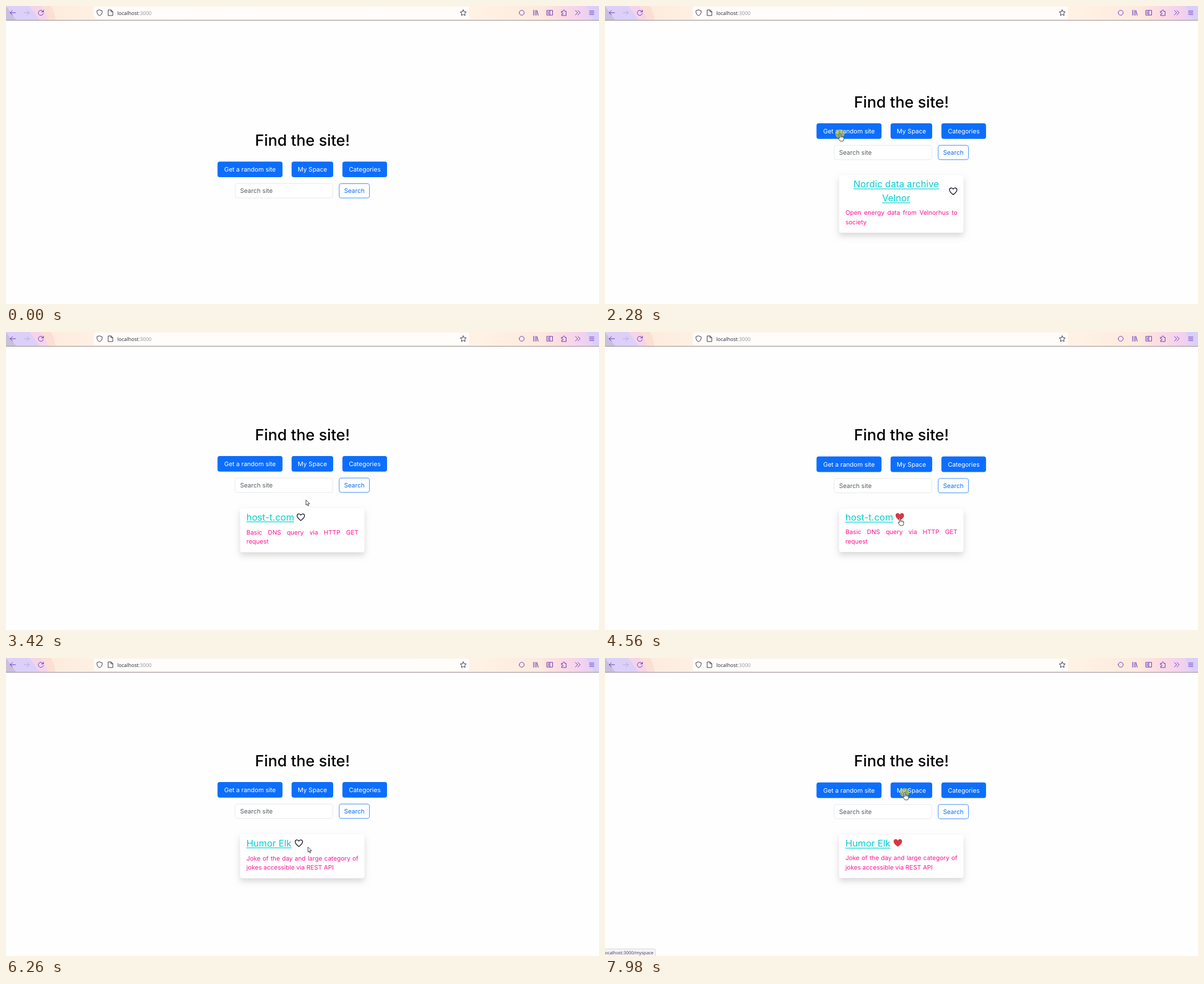
These frames come from a looping animation (1055 by 531 pixels, 8 s). An HTML page with a canvas:

```html
<!DOCTYPE html>
<html lang="en">
<head>
<meta charset="utf-8">
<title>Find the site!</title>
<style>
html, body { margin: 0; width: 100%; height: 100%; overflow: hidden; background: #fefefe; }
canvas { display: block; width: 1055px; height: 531px; }
</style>
</head>
<body>
<canvas id="stage" width="1055" height="531"></canvas>
<script>
const ctx = document.getElementById('stage').getContext('2d');
ctx.textRendering = 'geometricPrecision';
const LOOP = 8000;
const BLUE = '#0d6efd', PURPLE = '#5b22b5', DARK = '#211c30';
const SANS = 'Inter, sans-serif', UI = '"Open Sans", "Noto Sans", sans-serif';

const energy = {
  height: 102.5, titleY: 15.5, textY: 66.5, center: 518, heart: 619.5, heartY: 28.5,
  title: ['Nordic data archive', 'Velnor'],
  text: ['Open energy data from Velnorhus to', 'society']
};
const host = {
  height: 78.5, titleY: 15.5, textY: 42.5, heart: 524.5, heartY: 16,
  title: ['host-t.com'],
  text: ['Basic DNS query via HTTP GET', 'request']
};
const jokes = {
  ...host, heart: 521, title: ['Humor Elk'],
  text: ['Joke of the day and large category of', 'jokes accessible via REST API']
};
const liked = card => ({ ...card, liked: true, height: 77, titleY: 15, textY: 41, heartY: 14.5 });

// shift: vertical offset of the page content; cursor: [kind, x, y]
const idle = { shift: 0 };
const first = { shift: -68.3, card: energy, top: 301.6 };
const second = { shift: -56.3, card: host, top: 314 };
const secondLiked = { shift: -55.5, card: liked(host), top: 315 };
const third = { shift: -56.3, card: jokes, top: 314 };
const thirdLiked = { shift: -55.5, card: liked(jokes), top: 315 };
const loading = view => ({ ...view, shift: view.shift - 50, top: view.top + 50, spinner: true });

const timeline = [
  [0, idle],
  [570, idle, ['click', 437, 290]],
  [1140, loading(idle), ['beam', 438.7, 290.3]],
  [1710, first, ['beam', 438.7, 290.3]],
  [2280, first, ['click', 418, 228]],
  [2850, loading(first), ['arrow', 418, 228]],
  [3420, second, ['arrow', 533.7, 299.7]],
  [3990, second, ['click', 524, 332]],
  [4560, secondLiked, ['hand', 524.4, 332]],
  [5130, secondLiked, ['click', 423, 246]],
  [5690, loading(secondLiked), ['arrow', 423, 246]],
  [6260, third, ['arrow', 537.2, 337.2]],
  [6830, third, ['click', 519, 328]],
  [7400, thirdLiked, ['hand', 519.4, 328]],
  [7980, thirdLiked, ['click', 533, 240], 'localhost:3000/myspace']
];

// Text is set at one base size and scaled, so large text keeps the text cut of the font.
const BASE = 14;

function measure(str, size, weight = 400, family = SANS) {
  ctx.font = `${weight} ${BASE}px ${family}`;
  return ctx.measureText(str).width * size / BASE;
}

function write(str, x, y, size, color, { weight = 400, align = 'left', family = SANS } = {}) {
  const width = measure(str, size, weight, family);
  ctx.save();
  ctx.translate(align === 'center' ? x - width / 2 : x, y);
  ctx.scale(size / BASE, size / BASE);
  ctx.fillStyle = color;
  ctx.fillText(str, 0, 0);
  ctx.restore();
  return width;
}

function justify(str, x, y, width, size, color) {
  const words = str.split(' ');
  const used = words.reduce((sum, w) => sum + measure(w, size), 0);
  const gap = (width - used) / (words.length - 1);
  for (const w of words) x += write(w, x, y, size, color) + gap;
}

function box(x, y, w, h, r, fill, stroke) {
  ctx.beginPath();
  ctx.roundRect(x, y, w, h, r);
  if (fill) { ctx.fillStyle = fill; ctx.fill(); }
  if (stroke) { ctx.strokeStyle = stroke; ctx.lineWidth = 0.8; ctx.stroke(); }
}

function shape(d, x, y, { fill, stroke, width = 1, scale = 1 }) {
  const path = new Path2D(d);
  ctx.save();
  ctx.translate(x, y);
  ctx.scale(scale, scale);
  ctx.lineWidth = width;
  ctx.lineCap = ctx.lineJoin = 'round';
  if (fill) { ctx.fillStyle = fill; ctx.fill(path); }
  if (stroke) { ctx.strokeStyle = stroke; ctx.stroke(path); }
  ctx.restore();
}

function toolbarBack() {
  const fade = ctx.createLinearGradient(0, 0, 1055, 0);
  [[0, '#fde7d6'], [0.08, '#fdecdd'], [0.15, '#fef0e4'], [0.8, '#fff1e4'], [0.9, '#fdeade'],
    [0.935, '#fbdce2'], [0.97, '#f3d2ee'], [1, '#dccff8']].forEach(s => fade.addColorStop(...s));
  ctx.fillStyle = fade;
  ctx.fillRect(0, 0, 1055, 25);
  shape('M0 0H80Q87 12 88 25H0Z', 0, 0, { fill: '#fbdfd4' });
  shape('M0 0H61Q72 12 75 25H0Z', 0, 0, { fill: '#f5d4ea' });
  shape('M0 0H42L60 25H0Z', 0, 0, { fill: '#dcd0f9' });
  shape('M0 0L18 25H0Z', 0, 0, { fill: '#c8c0dc' });
  shape('M1033 0H1055V25H1046Z', 0, 0, { fill: '#d9cff8' });
  ctx.fillStyle = '#998d8c';
  ctx.fillRect(0, 25, 1055, 1);
}

function toolbar() {
  toolbarBack();
  box(156, 1, 668, 22, 3, '#fffcfa');
  const icon = (d, x, color = PURPLE) => shape(d, x, 12, { stroke: color, width: 0.9 });
  icon('M5 0H-4.5M-.5-4L-4.5 0L-.5 4', 12);
  icon('M-5 0H4.5M.5-4L4.5 0L.5 4', 37, '#b5a0d2');
  icon('M4.2-1.6A4.5 4.5 0 1 0 4.4 1.4M4.7-4.7V-1.4H1.4', 62);
  icon('M0-5L4.6-3.4V-.5Q4.2 3.5 0 5.4Q-4.2 3.5-4.6-.5V-3.4Z', 166.5, DARK);
  icon('M-3.8-5H1L4-2V5H-3.8ZM.8-4.8V-1.8H3.8', 186, DARK);
  icon('M0-5.2L1.6-1.8L5.3-1.4L2.6 1.2L3.3 4.9L0 3.1L-3.3 4.9L-2.6 1.2L-5.3-1.4L-1.6-1.8Z', 813.5, DARK);
  icon('M-4.4 0A4.4 4.4 0 1 0 4.4 0A4.4 4.4 0 1 0-4.4 0', 917.5);
  icon('M-4-4.5V4.5M-1.2-4.5V4.5M1.4-4V4.5M2-4L4.6 4.5', 942.5);
  icon('M-5-4.2H5V4.2H-5ZM0-4V4M-3.3-1.8H-1.7M-3.3 0H-1.7M-3.3 1.8H-1.7', 967.5);
  icon('M-4-2.5H-1.5V-3.5A1.5 1.5 0 0 1 1.5-3.5V-2.5H4V5H-4V2.8H-2.8A1.4 1.4 0 0 0-2.8 0H-4Z', 992.5);
  icon('M-4-4L0 0L-4 4M.5-4L4.5 0L.5 4', 1017);
  icon('M-4-3H4M-4 0H4M-4 3H4', 1042);
  const opts = { family: UI };
  const w = write('localhost', 198, 16, 9.05, '#29243a', opts);
  write(':3000', 198 + w, 16, 9.05, '#94909b', opts);
}

function controls(shift) {
  ctx.save();
  ctx.translate(0, shift);
  write('Find the site!', 527.5, 248.8, 27.5, '#000', { weight: 500, align: 'center' });
  for (const [label, x, w] of [['Get a random site', 376.3, 115.6], ['My Space', 508.1, 74], ['Categories', 598.5, 79.4]]) {
    box(x, 277.3, w, 27.8, 4.1, BLUE);
    write(label, x + w / 2, 295.3, 11, '#fff', { align: 'center' });
  }
  box(407.7, 316.5, 173.6, 25.6, 4.1, '#fff', '#dee2e6');
  write('Search site', 416.5, 333.1, 11, '#595c5f');
  box(592.8, 316.5, 53.8, 25.6, 4.1, null, BLUE);
  write('Search', 619.7, 333.1, 11, BLUE, { align: 'center' });
  ctx.restore();
}

function spinner(shift) {
  ctx.beginPath();
  ctx.arc(527.5, 403.2 + shift, 31.6, Math.PI * 7 / 6, Math.PI * 8 / 3);
  ctx.lineWidth = 2.75;
  ctx.lineCap = 'butt';
  ctx.strokeStyle = BLUE;
  ctx.stroke();
}

function drawCard(card, top) {
  ctx.save();
  ctx.shadowColor = 'rgba(0,0,0,.15)';
  ctx.shadowBlur = 11;
  ctx.shadowOffsetY = 5.5;
  box(416.5, top, 221.3, card.height, 4.1, '#fff');
  ctx.restore();

  card.title.forEach((line, i) => {
    const w = measure(line, 16.5);
    const x = card.center ? card.center - w / 2 : 427.7;
    const y = top + card.titleY + 6 + i * 24.8;
    write(line, x, y, 16.5, '#00ced1');
    ctx.fillStyle = '#00ced1';
    ctx.fillRect(x, y + 2.2, w, 1.2);
  });
  const [one, two] = card.text, y = top + card.textY + 4;
  justify(one, 427.7, y, 199.2, 11, '#ff1493');
  write(two, 427.7, y + 16.5, 11, '#ff1493');

  const heart = 'M0 6C-4 3-6.6.6-6.6-2.4C-6.6-6.4-1.8-7.2 0-3.7C1.8-7.2 6.6-6.4 6.6-2.4C6.6.6 4 3 0 6Z';
  shape(heart, card.heart, top + card.heartY,
    card.liked ? { fill: '#dc3545', scale: 1.14 } : { stroke: '#17172b', width: 1.35 });
}

function drawCursor([kind, x, y]) {
  const outlined = { fill: '#fff', stroke: '#2a2a32', width: 0.9 };
  if (kind === 'click') {
    ctx.beginPath();
    ctx.arc(x, y, 8.2, 0, Math.PI * 2);
    ctx.fillStyle = 'rgba(230,215,30,.6)';
    ctx.fill();
  }
  if (kind === 'beam') {
    shape('M-2.2-4.5H-.7L0-4L.7-4.5H2.2M0-4V4M-2.2 4.5H-.7L0 4L.7 4.5H2.2', x, y, { stroke: '#45454a', width: 0.9 });
  } else if (kind === 'arrow') {
    shape('M0 0V8.6L2 6.8L3.5 10.2L5 9.5L3.5 6.2H6.2Z', x, y, outlined);
  } else {
    shape('M-1 0Q0-1.6 1.2 0V4.4Q2.2 3.5 3.2 4.7Q4.3 4 5.2 5.2Q6.5 4.6 7 6V9L5.8 12.8H.4L-2.8 8.2Q-3.2 6.4-1 7.4Z', x, y, outlined);
    shape('M1.2 4.4V6.6M3.2 4.7V6.8M5.2 5.2V7', x, y, { stroke: '#2a2a32', width: 0.6 });
  }
}

function drawStatus(label) {
  box(-4, 518.4, 93.6, 16, [0, 2, 0, 0], '#f5f5f8', '#cfcfd6');
  write(label, -2, 528.4, 7.85, '#3a3a44', { family: UI });
}

function render() {
  const time = performance.now() % LOOP;
  const [, view, cursor, status] = timeline.findLast(step => step[0] <= time);
  ctx.fillStyle = '#fefefe';
  ctx.fillRect(0, 0, 1055, 531);
  toolbar();
  controls(view.shift);
  if (view.spinner) spinner(view.shift);
  if (view.card) drawCard(view.card, view.top);
  if (cursor) drawCursor(cursor);
  if (status) drawStatus(status);
  requestAnimationFrame(render);
}
render();
</script>
</body>
</html>
```
